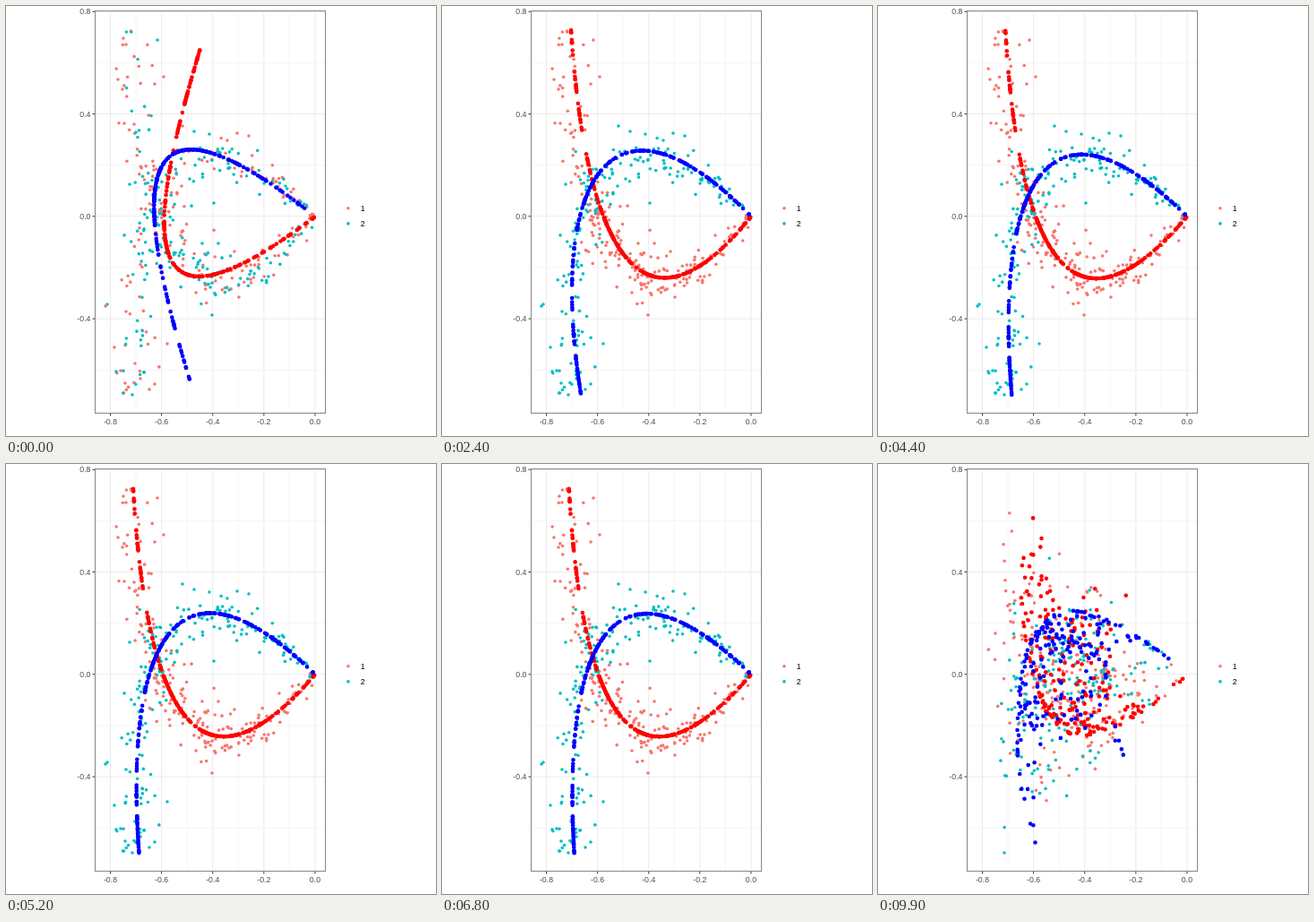
An HTML page with a canvas that plays this animation: 480 by 480 pixels, repeating every 10000 ms.

```html
<!DOCTYPE html>
<html>
<head>
<meta charset="utf-8">
<style>
  html, body { margin: 0; overflow: hidden; background: #fff; }
  canvas { display: block; width: 480px; height: 480px; }
</style>
</head>
<body>
<canvas width="480" height="480"></canvas>
<script>
const ctx = document.querySelector('canvas').getContext('2d');
const LOOP = 10000, LAST = 22, ORIGIN = [345, 235];
const PALE = ['#F8766D', '#00BFC4'], STRONG = ['#f00', '#00f'];

// Bezier handles and end point of curve 1 and curve 2 at three stages of the fit
const START = [[150, 383, 150, 270, 217, 47], [140, 72, 137, 195, 205, 417]];
const EARLY = [[222, 388, 160, 270, 144, 26], [190, 75, 117, 192, 155, 433]];
const FINAL = [[210, 390, 155, 270, 141.5, 27], [190, 85, 135, 200, 147, 435]];

// Conspicuous observations of each class
const STRAYS = [
  [[139.5, 28], [134, 43], [125, 82], [130, 93], [132, 131], [176, 79], [166, 87], [169, 38],
   [143, 132], [165, 183], [230, 345], [237, 265], [212, 320], [260, 325], [249, 317], [305, 256], [219, 265]],
  [[111, 335], [113, 333], [134, 341], [180, 377], [121, 381], [123, 408], [128, 407], [141, 434],
   [166, 422], [160, 428], [144, 399], [152, 362], [138, 199], [197, 134], [210, 140], [227, 143],
   [247, 150], [258, 142], [271, 145], [232, 220]]
];
const GAPS = [[[0.815, 0.83], [0.935, 0.955]], [[0.865, 0.885]]];

let seed = 20;
function random() {
  seed = (Math.imul(seed, 1664525) + 1013904223) >>> 0;
  return seed / 4294967296;
}
const gauss = () => (random() + random() + random() + random() - 2) * 1.73;
const mix = (a, b, k) => a.map((v, i) => v + (b[i] - v) * k);
const dist = (a, b) => Math.hypot(a[0] - b[0], a[1] - b[1]);

function bezier(c, t) {
  const u = 1 - t;
  return ORIGIN.map((o, i) =>
    u * u * u * o + 3 * u * u * t * c[i] + 3 * u * t * t * c[i + 2] + t * t * t * c[i + 4]);
}

function handles(step, group) {
  if (step < 2) return mix(START[group], EARLY[group], step / 2);
  return mix(FINAL[group], EARLY[group], 0.66 ** (step - 2));
}

function nearestT(pos, group) {
  let best = 0;
  for (let t = 0; t <= 1; t += 0.005) {
    if (dist(bezier(FINAL[group], t), pos) < dist(bezier(FINAL[group], best), pos)) best = t;
  }
  return best;
}

function makePoints() {
  const points = [];
  for (const group of [0, 1]) {
    for (const pos of STRAYS[group]) points.push({ pos, t: nearestT(pos, group), key: random() });
    for (let n = 0; n < 190; n++) {
      let t;
      do t = random(); while (GAPS[group].some(([a, b]) => t > a && t < b));
      const [x, y] = bezier(FINAL[group], t), sd = 13 * Math.min(1, 0.25 + 2.5 * t);
      const pos = [Math.max(120, x + sd * gauss()), Math.min(432, Math.max(29, y + sd * gauss()))];
      points.push({ pos, t, key: random() });
    }
  }
  points.sort((a, b) => a.key - b.key);
  // One borderline point changes class at every reassignment
  for (let k = 1; k <= 11; k++) {
    points.splice(12 * k, 0, { pos: [343 - random() * 4, 232 + random() * 6], t: 0.005, flip: k });
  }
  for (const p of points) p.first = random() < 0.5 ? 0 : 1;
  return points;
}
const points = makePoints();

function label(p, round) {
  if (p.flip) return round >= p.flip ? 1 : 0;
  if (!round) return p.first;
  const [a, b] = [0, 1].map(g => dist(bezier(handles(round - 1, g), p.t), p.pos));
  return a < b ? 0 : 1;
}

// States alternate between reassigning classes and refitting the curves
function makeState(s) {
  const round = Math.ceil(s / 2), step = Math.floor(s / 2);
  return [0, 1].map(group => {
    const curve = handles(step, group);
    return points.filter(p => label(p, round) === group)
      .map(p => ({ seen: p.pos, fit: bezier(curve, p.t) }));
  });
}
const states = Array.from({ length: LAST + 1 }, (_, s) => makeState(s));

// Rows are paired by their order within a class
function halfway(from, to) {
  return to.map((rows, g) => rows.map((row, i) => {
    const old = from[g][i % from[g].length];
    return { seen: mix(old.seen, row.seen, 0.5), fit: mix(old.fit, row.fit, 0.5) };
  }));
}
const tweens = states.map((state, s) => halfway(state, states[(s + 1) % states.length]));

const changeTime = s => s === LAST ? 9900 : s < 5 ? 300 + 500 * s : 2300 + 400 * (s - 4);

function stateAt(time) {
  let s = 0;
  while (s < LAST && time >= changeTime(s) + 100) s++;
  return time < changeTime(s) ? states[s] : tweens[s];
}

function line(x1, y1, x2, y2, color, width) {
  ctx.strokeStyle = color;
  ctx.lineWidth = width;
  ctx.beginPath();
  ctx.moveTo(x1, y1);
  ctx.lineTo(x2, y2);
  ctx.stroke();
}

function dot([x, y], radius, color) {
  ctx.fillStyle = color;
  ctx.beginPath();
  ctx.arc(x, y, radius, 0, 7);
  ctx.fill();
}

function text(str, x, y, align, color) {
  ctx.fillStyle = color;
  ctx.textAlign = align;
  ctx.fillText(str, x, y);
}

function drawAxes() {
  ctx.fillStyle = '#fff';
  ctx.fillRect(0, 0, 480, 480);
  ctx.font = '8.8px "Liberation Sans", Arial, sans-serif';
  for (let i = 0; i < 9; i++) {
    const x = 116.5 + 28.56 * i, y = 6.2 + 57.15 * i, width = i % 2 ? 0.5 : 1;
    line(x, 6, x, 454, '#ebebeb', width);
    if (i < 8) line(99, y, 356, y, '#ebebeb', width);
    if (i % 2) continue;
    line(x, 454.5, x, 457.5, '#333', 1);
    text((i / 10 - 0.8).toFixed(1).replace('-0.0', '0.0'), x, 467, 'center', '#4d4d4d');
    if (i > 6) continue;
    line(96.5, y, 99.5, y, '#333', 1);
    text((0.8 - i / 5).toFixed(1), 94.5, y + 3.2, 'right', '#4d4d4d');
  }
  ctx.strokeStyle = '#858585';
  ctx.lineWidth = 1;
  ctx.strokeRect(99.5, 5.5, 257, 449);
  PALE.forEach((color, i) => {
    dot([382, 225.7 + 17.2 * i], 1.8, color);
    text(String(i + 1), 395.8, 228.9 + 17.2 * i, 'left', '#000');
  });
}

function frame(now) {
  const state = stateAt(now % LOOP);
  drawAxes();
  state.forEach((rows, g) => rows.forEach(row => dot(row.seen, 1.8, PALE[g])));
  state.forEach((rows, g) => rows.forEach(row => dot(row.fit, 2.3, STRONG[g])));
  requestAnimationFrame(frame);
}
requestAnimationFrame(frame);
</script>
</body>
</html>
```
